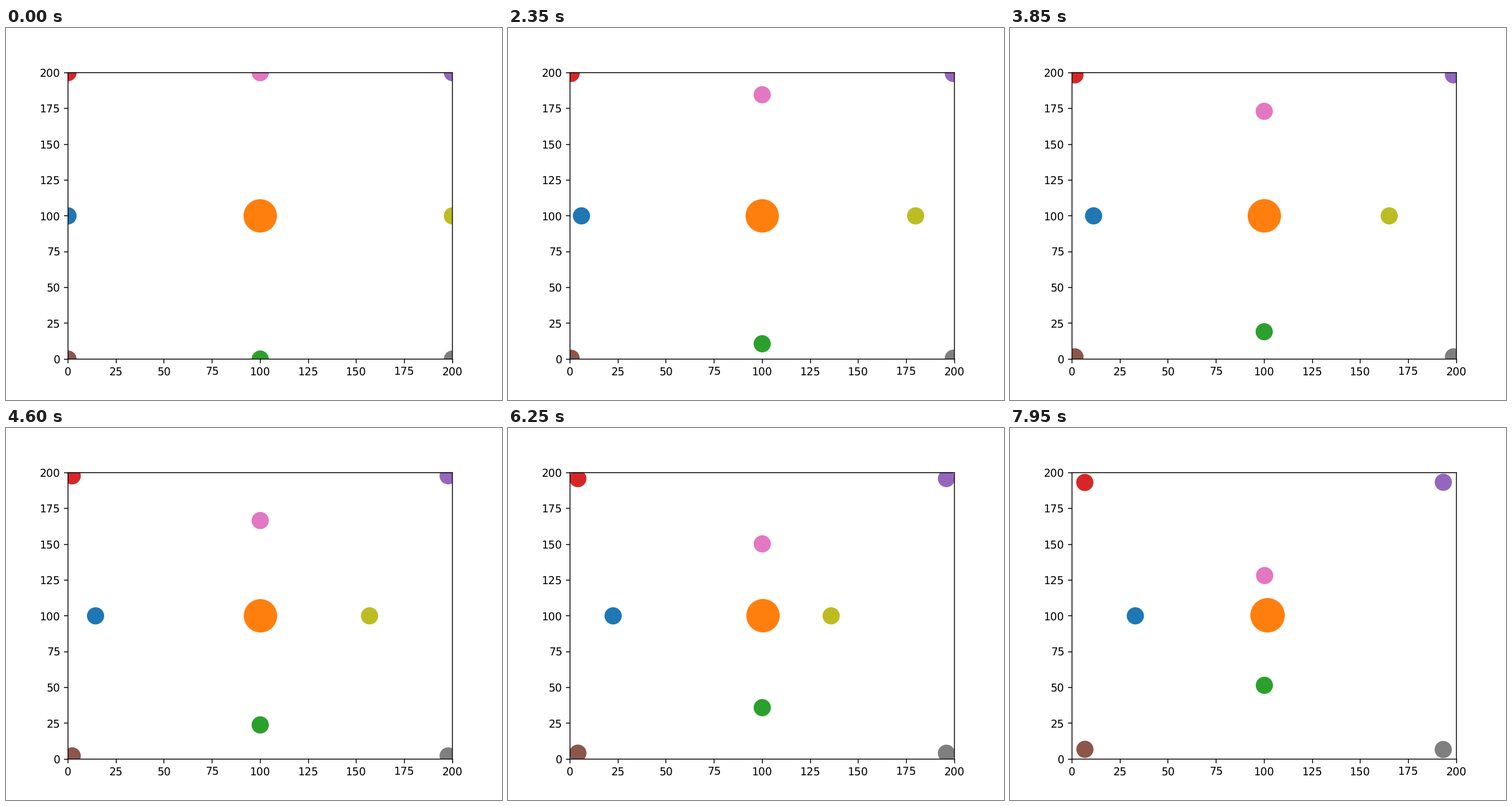
Write a matplotlib script that moves like this. It is 864 px wide and 648 px high and loops after 8 s.

```python
import numpy as np
import matplotlib.pyplot as plt
from matplotlib.animation import FuncAnimation

FRAMES = 160
INTERVAL = 50
SIDE = 200
MERGE_DIST = 10
SUN_MASS, SUN_DIAM, DIAM = 10, 31, 16   # diameters in points

plt.rcParams["path.snap"] = False
plt.rcParams["text.hinting"] = "none"


def make_bodies():
    """A heavy centre, four inward movers and four resting corners."""
    mid = SIDE / 2
    pos, vel, colors = [(mid, mid)], [(0, 0)], ["C1"]
    speeds = (0.4, 0.3, 0.1, 0.2)       # right, top, left, bottom
    for k, speed in enumerate(speeds):
        angle = k * np.pi / 2
        out = np.round([np.cos(angle), np.sin(angle)])
        turn = np.array([-out[1], out[0]])
        pos += [mid + mid * out, mid + mid * (out + turn)]
        vel += [-speed * out, (0, 0)]
    colors += ["C8", "C4", "C6", "C3", "C0", "C5", "C2", "C7"]
    mass, diam = np.ones(len(pos)), np.full(len(pos), float(DIAM))
    mass[0], diam[0] = SUN_MASS, SUN_DIAM
    return np.array(pos, float), np.array(vel, float), mass, diam, colors


def step(pos, vel, mass):
    delta = pos[None] - pos[:, None]
    dist = np.linalg.norm(delta, axis=2)
    np.fill_diagonal(dist, 1)
    pull = (delta * (mass / dist ** 3)[..., None]).sum(axis=1)
    return pos + vel, vel + pull


def absorb(pos, vel, mass, diam):
    """The centre swallows close bodies, keeping momentum and volume."""
    near = np.linalg.norm(pos - pos[0], axis=1) < MERGE_DIST
    if near.sum() == 1:
        return
    total = mass[near].sum()
    for v in (pos, vel):
        v[0] = (mass[near, None] * v[near]).sum(axis=0) / total
    diam[0] *= (total / mass[0]) ** (1 / 3)
    near[0] = False
    mass[0], mass[near], diam[near] = total, 0, 0
    pos[near] = -SIDE                   # park the swallowed body off stage


def simulate():
    pos, vel, mass, diam, colors = make_bodies()
    states = []
    for _ in range(FRAMES):
        states.append((pos.copy(), diam ** 2))
        pos, vel = step(pos, vel, mass)
        absorb(pos, vel, mass, diam)
    return states, colors


states, colors = simulate()
fig, ax = plt.subplots(figsize=(6.4, 4.8), dpi=135)
ax.set_xlim(0, SIDE)
ax.set_ylim(0, SIDE)
start, areas = states[0]
dots = ax.scatter(*start.T, s=areas, c=colors, linewidths=0)


def draw(frame):
    pos, areas = states[frame]
    dots.set_offsets(pos)
    dots.set_sizes(areas)
    return [dots]


anim = FuncAnimation(fig, draw, frames=FRAMES, interval=INTERVAL,
                     init_func=lambda: draw(0), repeat=True, repeat_delay=0)
plt.show()
```
